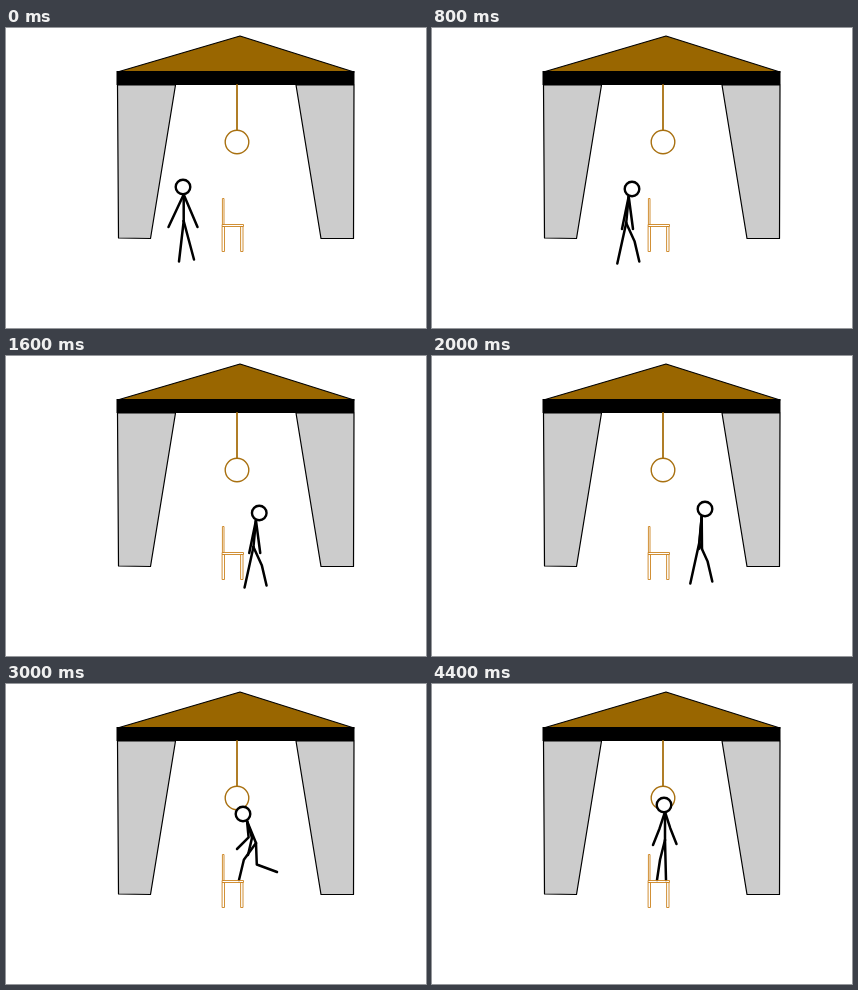
An HTML page with a canvas for the animation above (4800 ms loop, 420 px wide and 300 px high).

```html
<!DOCTYPE html>
<html lang="en">
<head>
<meta charset="utf-8">
<title>Stick figure on a stage</title>
<style>
html, body { margin: 0; width: 100%; height: 100%; overflow: hidden; background: #fff; }
canvas { display: block; }
</style>
</head>
<body>
<canvas id="stage" width="420" height="300"></canvas>
<script>
const ctx = document.getElementById('stage').getContext('2d');
const STEP = 200, LOOP = 4800, LAST_STEP = 22;
const ROPE = '#a87010', WOOD = '#cc8420';

// Blends numbers, points or whole poses.
const mix = (a, b, t) => Array.isArray(a) ? a.map((v, i) => mix(v, b[i], t)) : a + (b - a) * t;

// Head position at a few steps of the walk: [step, x, y]
const path = [[0, 177, 159], [2, 178, 159], [4, 200, 161], [6, 233.5, 161], [10, 273, 153], [12, 256, 155]];

function headAt(step) {
  const next = Math.max(1, path.findIndex(key => key[0] >= step));
  const from = path[next - 1], to = path[next];
  return mix(from, to, (step - from[0]) / (to[0] - from[0])).slice(1);
}

// Pose: head, neck, hip, two hands, two feet, bends of elbows and knees
function walkPose(step) {
  const [x, y] = headAt(step);
  const idle = step < 3;
  const facing = idle || step === 11 ? 0 : Math.sign(11 - step);
  const stride = idle ? 7.5 : facing ? 7.5 + 3.5 * Math.cos(Math.PI * step) : 11;
  const swing = idle ? 14.5 - 4.5 * step : 3.5 + 2 * Math.cos(Math.PI / 2 * step);
  const handX = x - 4.5 * facing;
  const footX = x + (facing ? -3.7 * facing : 3.5);
  return [
    [x, y],
    [x + (facing ? -3.3 * facing : 0.7), y + 7.5],
    [x + (facing ? -5.8 * facing : 0.7), y + 34],
    [handX - swing, y + 40], [handX + swing, y + 40],
    [footX - stride, y + 74.5], [footX + stride, y + 72.5],
    [0, 0, 0, 2 * facing]
  ];
}

const stand = (handA, handB, bend) => [[232, 121], [233, 128], [233, 156],
  handA, handB, [225, 196], [234, 196], [bend, -bend, -1, 0]];

const climb = [[237, 130], [241, 137], [250, 159],
  [231, 165], [242, 171], [233, 196], [271, 188], [7, 4.5, -4, -12]];
const armsWide = stand([208, 149], [259, 146], 5.7);
const armsDown = stand([221, 161], [244.5, 160], 0.5);

const easeIn = t => t ** 1.4;
const easeOut = t => 1 - (1 - t) ** 4;
const backIn = t => t * t * (2.1 * t - 1.1);

function poseAt(step) {
  if (step <= 12) return walkPose(step);
  if (step <= 15) return mix(walkPose(12), climb, easeIn((step - 12) / 3));
  if (step <= 18) return mix(climb, armsWide, easeOut((step - 15) / 3));
  return mix(armsWide, armsDown, backIn((step - 18) / 4));
}

function paint(fill, stroke, width) {
  if (fill) {
    ctx.fillStyle = fill;
    ctx.fill();
  }
  ctx.strokeStyle = stroke;
  ctx.lineWidth = width;
  ctx.stroke();
}

function line(points, stroke, width) {
  ctx.beginPath();
  points.forEach(p => ctx.lineTo(...p));
  paint(null, stroke, width);
}

function polygon(points, fill) {
  ctx.beginPath();
  points.forEach(p => ctx.lineTo(...p));
  ctx.closePath();
  paint(fill, '#000', 1.2);
}

function circle([x, y], radius, stroke, width, fill) {
  ctx.beginPath();
  ctx.arc(x, y, radius, 0, 2 * Math.PI);
  paint(fill, stroke, width);
}

function drawStage() {
  polygon([[111.5, 57], [169.5, 57], [144.5, 210.5], [112.5, 210]], '#ccc');
  polygon([[290, 57], [348, 57], [347.5, 210.5], [315, 210.5]], '#ccc');
  polygon([[111.5, 44], [234, 8], [348, 44]], '#960');
  ctx.fillStyle = '#000';
  ctx.fillRect(110.5, 43, 238, 14);
  line([[231, 57], [231, 102]], ROPE, 1.8);
  circle([231, 114], 11.8, ROPE, 1.4);
}

function drawChair() {
  ctx.beginPath();
  ctx.rect(216.8, 170.5, 1.2, 26);
  ctx.rect(216.5, 196.5, 21, 2);
  for (const x of [216.5, 235]) ctx.rect(x, 198.5, 2, 25);
  paint(null, WOOD, 0.9);
}

// Bends the limb sideways at its middle by the given pixels.
function drawLimb(start, end, bend) {
  const dx = end[0] - start[0], dy = end[1] - start[1];
  const [x, y] = mix(start, end, 0.5);
  const k = bend / Math.hypot(dx, dy);
  line([start, [x + dy * k, y - dx * k], end], '#000', 2.5);
}

function drawFigure([head, neck, hip, handA, handB, footA, footB, bends]) {
  drawLimb(neck, hip, 0);
  [handA, handB, footA, footB].forEach((end, i) => drawLimb(i < 2 ? neck : hip, end, bends[i]));
  circle(head, 7.3, '#000', 2.4, '#fff');
}

function render(now) {
  ctx.clearRect(0, 0, 420, 300);
  drawStage();
  drawFigure(poseAt(Math.min(LAST_STEP, Math.floor(now % LOOP / STEP))));
  drawChair();
  requestAnimationFrame(render);
}

ctx.lineCap = ctx.lineJoin = 'round';
render(0);
</script>
</body>
</html>
```
